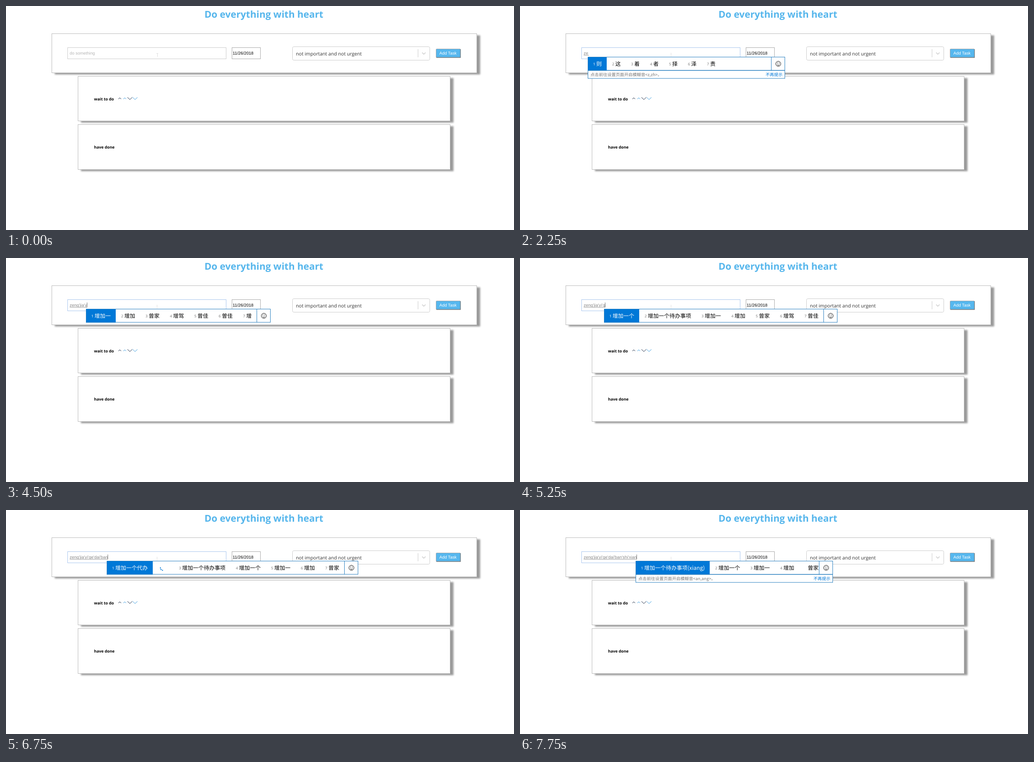
Animation, 1125 px wide and 498 px high, one loop 8000 ms. Source, as an HTML page:

```html
<!DOCTYPE html>
<html lang="en">
<head>
<meta charset="utf-8">
<title>Task list</title>
<style>
  html, body { margin: 0; width: 100%; height: 100%; overflow: hidden; background: #fff; }
  .panel { position: absolute; box-sizing: border-box; background: #fff;
    border: 1px solid #bbb; box-shadow: 7px 3.5px 3.5px #999; }
  svg { position: absolute; left: 0; top: 0; }
  text { white-space: pre; text-rendering: geometricPrecision; }
  .ui { font-family: "Open Sans", sans-serif; }
  .form { font: 9.33px "Liberation Sans", Arial, sans-serif; }
  .typed { font-size: 9.45px; fill: #888; }
  .cand { font: 12px "Noto Sans CJK SC", "Noto Sans CJK", sans-serif; }
  .num { font: 8px "Noto Sans", sans-serif; }
  .hint { font: 9.33px "Noto Sans CJK SC", "Noto Sans CJK", sans-serif; }
</style>
</head>
<body>
<div class="panel" style="left:101px;top:61px;width:942px;height:88px"></div>
<div class="panel" style="left:159px;top:156px;width:825px;height:100px"></div>
<div class="panel" style="left:159px;top:263px;width:825px;height:101px"></div>
<svg width="1125" height="498" fill="none">
  <g class="ui">
    <text x="439.5" y="26" font-size="21.05" font-weight="700" fill="#56b6ec">Do everything with heart</text>
    <g font-size="8.76" font-weight="700" fill="#000">
      <text x="195" y="210">wait to do</text>
      <text x="195" y="317">have done</text>
    </g>
    <rect x="634.5" y="90.5" width="304" height="30" rx="3" stroke="#ccc"/>
    <text x="642" y="110" font-size="10.62" fill="#333">not important and not urgent</text>
  </g>
  <path d="M912.5 96V114" stroke="#ccc"/>
  <path d="M921.5 103.5l3.8 3.8 3.8-3.8" stroke="#ccc" stroke-width="1.5"/>
  <path d="M249 207l3-3 3 3M269 203l5.3 5 5.3-5" stroke="#1c2b45"/>
  <path d="M260 207l3-3 3 3M280.5 203l5.3 5 5.3-5" stroke="#3f9fe0"/>
  <rect id="field" x="136.5" y="92.5" width="351" height="25"/>
  <rect x="500.5" y="92.5" width="63" height="25" stroke="#aaa"/>
  <rect x="952.5" y="95.5" width="54" height="19" rx="1.5" fill="#56b7ee" stroke="#a3a7ab"/>
  <path d="M953 114.5H1006.5V96" stroke="#777" stroke-width="1.3"/>
  <g class="form">
    <text x="502" y="108" fill="#000">11/26/2018</text>
    <text x="959.8" y="108" fill="#fff">Add Task</text>
  </g>
  <path id="pointer" stroke="#ddd"/>
  <g id="live"></g>
</svg>
<script>
const LOOP = 8000, BLUE = '#0078d7', EDGE = '#2a80c0';
const $ = id => document.getElementById(id);

// Composition steps: start, pinyin, popup x, candidates ("*" = spinner), options
const steps = [
  [1250, "z", 144, "在 中 这 再 做 之 至"],
  [1750, "ze", 150, "则 这 着 者 择 泽 责", { hint: "z,zh" }],
  [2750, "zeng", 160, "增 曾 赠 憎 正 整 证", { hint: "z,zh" }],
  [3000, "zeng'j", 163, "增加 曾经 增进 增减 增 曾 赠"],
  [3250, "zeng'jia", 171, "增加 曾家 增驾 曾佳 曽佳 增 曾", { edge: 521, end: 525 }],
  [3500, "zeng'jia", 171, "增加 曾家 增驾 曾佳 曽佳 增 曾"],
  [4500, "zeng'jia'y", 177, "增加一 增加 曾家 增驾 曾佳 曽佳 增"],
  [4750, "zeng'jia'yi", 179, "增加一 增加 曾家 增驾 曾佳 曽佳 增"],
  [5250, "zeng'jia'yi'g", 186, "增加一个 增加一个待办事项 增加一 增加 曾家 增驾 曾佳"],
  [5500, "zeng'jia'yi'ge", 191, "增加一个 增加一个待办事项 增加一 增加 曾家 增驾 曾佳"],
  [5750, "zeng'jia'yi'ge'd", 198, "增加一个的 增加一个待办事项 增加一个 增加一 增加 曾家"],
  [6000, "zeng'jia'yi'ge'da", 204, "增加一个大 * 增加一个待办事项 增加一个 增加一 增加 曾家", { ring: [130, 155, 180] }],
  [6250, "zeng'jia'yi'ge'dai", 206, "增加一个带 * 增加一个待办事项 增加一个 增加一 增加 曾家", { ring: [153, 207] }],
  [6500, "zeng'jia'yi'ge'dai'b", 213, "增加一个待办 增加一个待办事项 增加一个 增加一 增加 曾家"],
  [6750, "zeng'jia'yi'ge'dai'ban", 223, "增加一个代办 * 增加一个待办事项 增加一个 增加一 增加 曾家", { ring: [100, 140, 180] }],
  [7000, "zeng'jia'yi'ge'dai'ban's", 230, "增加一个代办是 * 增加一个待办事项 增加一个 增加一 增加 曾家", { ring: [150, 180, 210] }],
  [7250, "zeng'jia'yi'ge'dai'ban'shi", 237, "增加一个代办是 * 增加一个待办事项 增加一个 增加一 增加 曾家",
    { edge: 753, end: 806, ring: [88, 140, 178, 220, 268] }],
  [7500, "zeng'jia'yi'ge'dai'ban'shi'xi", 246, "增加一个待办事项 增加一个 增加一 增加 曾家 增驾"],
  [7750, "zeng'jia'yi'ge'dai'ban'shi'xian", 256, "增加一个待办事项(xiang) 增加一个 增加一 增加 曾家", { hint: "an,ang" }],
];
const caretOff = [[750, 1250], [2250, 2750], [4000, 4500]];

const escapeText = s => s.replace(/</g, '&lt;').replace(/>/g, '&gt;');
const text = (cls, x, y, fill, s) => `<text class="${cls}" x="${x}" y="${y}" fill="${fill}">${escapeText(s)}</text>`;
const rect = (x, y, w, h, attrs) => `<rect x="${x}" y="${y}" width="${w}" height="${h}" ${attrs}/>`;
const path = (d, stroke) => `<path d="${d}" stroke="${stroke}"/>`;
const cellWidth = s => s === '*' ? 46 : [...s].reduce((w, c) => w + (c > '~' ? 12 : 5.45), 30);

function spinner(cx, angles) {
  return angles.map(a => {
    const r = a * Math.PI / 180;
    return `<circle cx="${cx + 5.5 * Math.cos(r)}" cy="${128.7 + 5.5 * Math.sin(r)}" r="1.2" fill="${BLUE}"/>`;
  }).join('');
}

function smiley(cx) {
  return `<circle cx="${cx}" cy="128.5" r="5.6" stroke="#111"/>` +
    `<path d="M${cx - 3} 130q3 3.4 6 0" stroke="#111"/>` +
    rect(cx - 2.7, 126, 1.4, 1.6, 'fill="#111"') + rect(cx + 1.3, 126, 1.4, 1.6, 'fill="#111"');
}

function popup(x, list, { hint, edge, end, ring } = {}) {
  const words = list.split(' ');
  const total = words.reduce((w, s) => w + cellWidth(s), 0);
  const cellsEnd = hint ? x + 406 : x + total;
  const right = cellsEnd + 31;
  const shown = end || right;
  let out = rect(x, 113, shown - x, hint ? 48 : 30.5, 'fill="#fff"');
  let left = x;
  words.forEach((word, i) => {
    const w = cellWidth(word), first = i === 0;
    if (first) out += rect(x, 113, w, 30.5, `fill="${BLUE}"`);
    if (word === '*') out += spinner(left + 22.5, ring);
    else {
      if (left + w <= (edge ? shown : cellsEnd)) out += text('num', left + 12, 132.3, first ? '#fff' : '#777', `${i + 1}`);
      out += text('cand', left + 19, 133.4, first ? '#fff' : '#000', word);
    }
    left += w;
  });
  if (edge) return out + path(`M${x} 113.5H${edge}M${x} 143H${edge}`, EDGE);
  out += rect(x + .5, 113.5, right - x - 1, 29.5, `stroke="${EDGE}"`) +
    path(`M${cellsEnd + .5} 113V143`, EDGE) + smiley(cellsEnd + 16);
  if (hint) {
    out += rect(x + .5, 143.5, right - x - 1, 17.5, `stroke="${EDGE}"`) +
      text('hint', x + 6, 155.7, '#777', `点击前往设置页面开启模糊音<${hint}>。`) +
      text('hint', right - 43, 155.7, BLUE, '不再提示');
  }
  return out;
}

function scene(t) {
  const step = steps.filter(s => s[0] <= t).pop();
  const caretX = step ? step[2] + 2.5 : 141.5;
  const caret = t >= 250 && !caretOff.some(([a, b]) => t >= a && t < b);
  let out = step
    ? text('form typed', 141, 108, '#888', step[1]) + path(`M141 109.5H${caretX}`, '#999')
    : text('form', 141, 108, '#b5b5b5', 'do something');
  if (caret) out += path(`M${caretX} 99V110`, '#777');
  return step ? out + popup(...step.slice(2)) : out;
}

let lastTick = -1;
function draw(now) {
  const tick = Math.floor(now % LOOP / 250);
  if (tick !== lastTick) {
    lastTick = tick;
    const t = tick * 250;
    $('field').setAttribute('stroke', t < 250 ? '#ccc' : '#a9c6ee');
    $('pointer').setAttribute('d', t < 500 ? 'M333 105.5h4M335.5 106v7' : 'M334.5 104v8');
    $('live').innerHTML = scene(t);
  }
  requestAnimationFrame(draw);
}
const start = performance.now();
const frame = () => { draw0(); };
requestAnimationFrame(draw);
</script>
</body>
</html>
```
